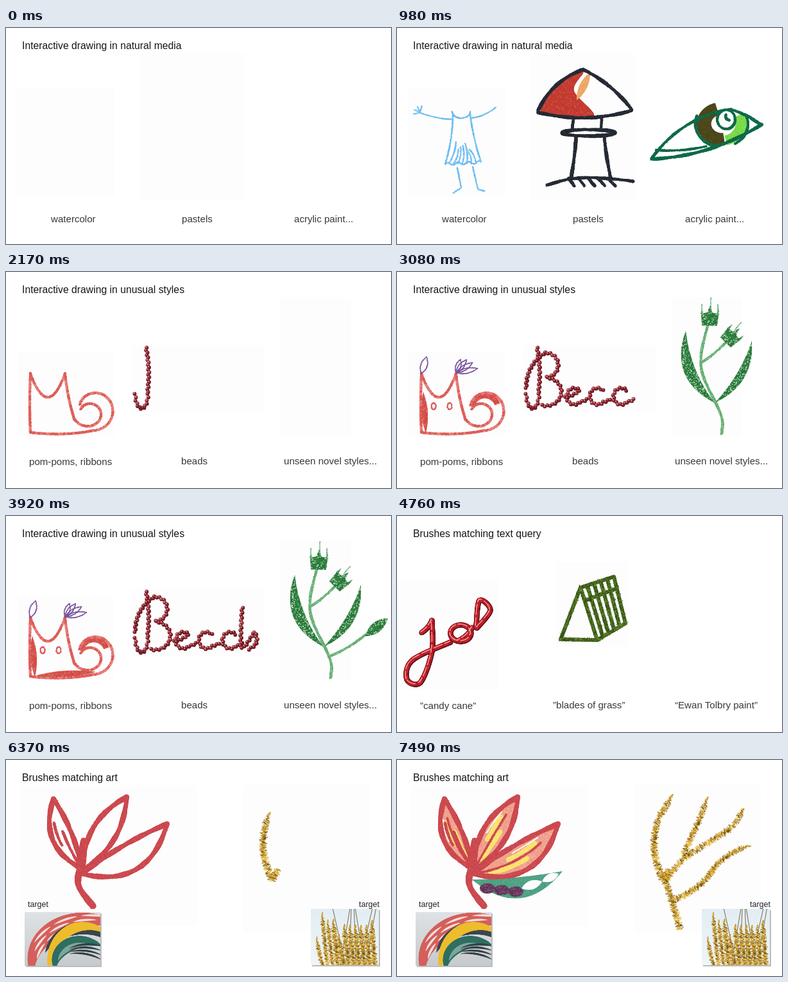
Write an HTML page with a canvas that moves like this. It is 600x338 px and loops after 7560 ms.

```html
<!DOCTYPE html>
<html lang="en">
<head>
<meta charset="utf-8">
<title>Brush styles</title>
<style>
html, body { margin: 0; width: 100%; height: 100%; overflow: hidden; background: #fff; }
canvas, svg { position: absolute; left: 0; top: 0; width: 600px; height: 338px; }
text { font-family: "Liberation Sans", Arial, sans-serif; }
.title { font-size: 15.75px; fill: #161616; }
.caption { font-size: 15.1px; fill: #383838; }
.small { font-size: 12.5px; fill: #222; }
</style>
</head>
<body>
<canvas id="art" width="600" height="338"></canvas>
<svg id="labels" viewBox="0 0 600 338"></svg>
<script>
const LOOP = 7560, STEP = 70;
const ctx = document.getElementById('art').getContext('2d');
const labels = document.getElementById('labels');

// Repeatable noise in 0..1
const noise = (i, k) => {
  const s = Math.sin(i * 12.9898 + k * 78.233) * 43758.5453;
  return s - Math.floor(s);
};
const jitter = (i, k, size) => (noise(i, k) - 0.5) * 2 * size;
const pick = (list, i, k) => list[Math.floor(noise(i, k) * list.length)];
const lerp = (a, b, t) => a + (b - a) * t;
const between = (a, b, t) => [lerp(a[0], b[0], t), lerp(a[1], b[1], t)];
const rad = deg => deg * Math.PI / 180;
const range = (n, fn) => Array.from({ length: n }, (_, i) => fn(i));

// Paths: lists of points about one pixel apart
const sample = (length, at) => {
  const n = Math.max(2, Math.round(length));
  return range(n + 1, i => at(i / n));
};

// Line that swells sideways by `bend` at its middle
const bow = (x1, y1, x2, y2, bend = 0) => {
  const len = Math.hypot(x2 - x1, y2 - y1);
  return sample(len + Math.abs(bend), t => {
    const off = 4 * t * (1 - t) * bend / len;
    return [lerp(x1, x2, t) - (y2 - y1) * off, lerp(y1, y2, t) + (x2 - x1) * off];
  });
};

// Elliptic arc, or a spiral when `shrink` differs from 1
const arc = (cx, cy, rx, ry, from, to, shrink = 1) =>
  sample(rad(Math.abs(to - from)) * (rx + ry) / 2, t => {
    const a = rad(lerp(from, to, t)), s = lerp(1, shrink, t);
    return [cx + rx * s * Math.cos(a), cy + ry * s * Math.sin(a)];
  });

// Closed shape between two bows sharing their ends
const blade = (x1, y1, x2, y2, bendA, bendB) =>
  [...bow(x1, y1, x2, y2, bendA), ...bow(x1, y1, x2, y2, bendB).reverse()];
const lens = (x1, y1, x2, y2, fat) => blade(x1, y1, x2, y2, fat, -fat);
const ray = (x, y, deg, len) => [x, y, x + len * Math.cos(rad(deg)), y + len * Math.sin(rad(deg))];

// Part of the ring between two ellipses
const ring = (cx, cy, rx, ry, from, to, inner) =>
  [...arc(cx, cy, rx, ry, from, to), ...arc(cx, cy, rx * inner, ry * inner, to, from)];

const wave = (x1, y1, x2, y2, size, cycles) => bow(x1, y1, x2, y2)
  .map(([x, y], i, all) => [x, y - size * Math.sin(i / all.length * cycles * 2 * Math.PI)]);

// Smooth curve through a few points
const spline = (path, closed) => {
  const knots = path.split(' ').map(p => p.split(',').map(Number)), n = knots.length;
  const at = i => closed ? knots[(i + n) % n] : knots[Math.max(0, Math.min(n - 1, i))];
  return range(closed ? n : n - 1, i => {
    const [a, b, c, d] = [at(i - 1), at(i), at(i + 1), at(i + 2)];
    const mix = (k, u) => 0.5 * (2 * b[k] + (c[k] - a[k]) * u
      + (2 * a[k] - 5 * b[k] + 4 * c[k] - d[k]) * u * u
      + (3 * b[k] - a[k] - 3 * c[k] + d[k]) * u * u * u);
    return sample(Math.hypot(c[0] - b[0], c[1] - b[1]), u => [mix(0, u), mix(1, u)]);
  }).flat();
};

// Toothed flower head growing from x,y
const bud = (x, y, deg, size) => {
  const a = rad(deg);
  return range(17, i => {
    const side = (i - 8) / 8;
    const out = size * (Math.abs(side) === 1 ? 0 : i % 4 ? 0.72 : 1.1) * (1 - 0.2 * Math.abs(side));
    const wide = size * 0.5 * Math.sin(side * Math.PI * 0.7);
    return [x + out * Math.cos(a) - wide * Math.sin(a), y + out * Math.sin(a) + wide * Math.cos(a)];
  });
};

function dot(x, y, r, color) {
  ctx.fillStyle = color;
  ctx.beginPath();
  ctx.arc(x, y, r, 0, 7);
  ctx.fill();
}

function dash(x, y, angle, len, width, color) {
  const dx = Math.cos(angle) * len / 2, dy = Math.sin(angle) * len / 2;
  ctx.strokeStyle = color;
  ctx.lineWidth = width;
  ctx.beginPath();
  ctx.moveTo(x - dx, y - dy);
  ctx.lineTo(x + dx, y + dy);
  ctx.stroke();
}

// First tone is the body, the rest are grain
const tones = {
  sky: ['#72bdf0', '#5fb0ea', '#9fdaf8'],
  coal: ['#262b35', '#1b1f27', '#3a404b'],
  pine: ['#0f6b49', '#0b5c3d', '#1b7b58'],
  brick: ['#c33b31', '#cb453a', '#b6322a', '#d76a5c'],
  peach: ['#eca663', '#f3bb85'],
  olive: ['#4c481c', '#5a5422', '#403c17'],
  lime: ['#7ada4b', '#8ae35f', '#6ccc42'],
  blush: ['#d6534c', '#e2847a', '#c23d3c'],
  coral: ['#e0615c', '#c94447'],
  plum: ['#6a4390', '#8460a8'],
  fern: ['#6db37a', '#a9d6ae', '#4f9a5d'],
  lace: ['#2c7d3d', '#226d33', '#e9f4e8', '#3a8b4a'],
  berry: ['#cc4a50', '#d65d61', '#bf3f46'],
  pink: ['#f0a18e', '#f6bba9', '#ea8d7e'],
  lemon: ['#fae46d', '#f5d857', '#fdf0a4'],
  sea: ['#4fa283', '#63b495', '#43917a'],
  wine: ['#6a3d60', '#4b2645', '#83577a'],
  rose: ['#e2307e', '#ec5b99'],
  sun: ['#f6cf2c', '#f9dd60'],
  aqua: ['#2fb2c4', '#57c5d3'],
  white: ['#fdfdfd']
};

const stroke = (paths, draw) => {
  const pts = paths.flatMap(path => path.map(([x, y], i) => {
    const o = path[Math.max(0, i - 1)], q = path[Math.min(path.length - 1, i + 1)];
    return [x, y, Math.atan2(q[1] - o[1], q[0] - o[0])];
  }));
  return { size: pts.length, draw: p => draw(pts.slice(0, Math.ceil(pts.length * p))) };
};

const rough = (tone, width, ...paths) => stroke(paths, pts => {
  const r = width / 2;
  pts.forEach(([x, y], i) => dot(x + jitter(i, 1, 0.35), y + jitter(i, 2, 0.35),
    r * (0.93 + 0.12 * Math.sin(i / 7)), tones[tone][0]));
  pts.forEach(([x, y], i) => dot(x + jitter(i, 5, r * 0.8), y + jitter(i, 6, r * 0.8),
    0.7, pick(tones[tone], i, 4)));
});

const ribbon = (...paths) => stroke(paths, pts => pts.forEach(([x, y, a], i) => {
  dot(x + jitter(i, 1, 0.4), y + jitter(i, 2, 0.4), 2, pick(['#e0615c', '#e8817b'], i >> 2, 3));
  if (i % 6 === 0) dash(x, y, a + 0.9, 4.6, 1.5, '#c94447');
}));

const beads = (...paths) => stroke(paths, pts => pts.forEach(([x, y, a], i) => {
  if (i % 4) return;
  const side = i % 8 ? 0.9 : -0.9;
  const bx = x - Math.sin(a) * side, by = y + Math.cos(a) * side;
  dot(bx + 0.4, by + 0.6, 2.9, '#5a141c');
  dot(bx, by, 2.4, pick(['#9a2631', '#87202a', '#b04350'], i, 1));
  dot(bx - 0.6, by - 0.6, 1, '#dfa5a9');
}));

const candy = (...paths) => stroke(paths, pts => {
  pts.forEach(([x, y]) => dot(x + 0.4, y + 0.5, 4.1, '#4e1015'));
  pts.forEach(([x, y], i) => dot(x, y, 3.2, i % 14 < 9 ? '#c5202b' : '#ae1722'));
  pts.forEach(([x, y], i) => i % 17 < 14 && dot(x - 0.9, y - 0.9, 0.8, '#eea9aa'));
});

const grass = (...paths) => stroke(paths, pts => {
  pts.forEach(([x, y]) => dot(x, y, 2.8, '#3f5e1c'));
  pts.forEach(([x, y, a], i) => dash(x + jitter(i, 1, 2.3), y + jitter(i, 2, 2.3),
    a + jitter(i, 3, 1.2), 5, 1, pick(['#2b4512', '#5d8128', '#47691f', '#71923a'], i, 4)));
});

// Fine cross hatching, thin at the start of the branch
const blossom = (width, ...paths) => stroke(paths, pts => pts.forEach(([x, y, a], i) => {
  const w = width * Math.min(1, 0.3 + i / 24);
  for (let k = 0; k < 3; k++) {
    const off = jitter(i, k + 1, w * 0.35);
    dash(x - Math.sin(a) * off, y + Math.cos(a) * off, a + 1.57 + jitter(i, k + 5, 0.6),
      w * (0.25 + 0.4 * noise(i, k + 11)), 0.9,
      pick(['#dfa71f', '#efc034', '#c88f18', '#e6b22a', '#ecc85c', '#7b591a', '#3b2c13'], i, k + 7));
  }
}));

const area = (tone, pts, grain = 0.15) => {
  const xs = pts.map(p => p[0]), ys = pts.map(p => p[1]);
  const x0 = Math.min(...xs), y0 = Math.min(...ys);
  const w = Math.max(...xs) - x0, h = Math.max(...ys) - y0;
  return {
    size: Math.max(20, w * h / 14),
    draw(p) {
      ctx.save();
      ctx.beginPath();
      pts.forEach(([x, y]) => ctx.lineTo(x, y));
      ctx.clip();
      ctx.fillStyle = tones[tone][0];
      ctx.fillRect(x0, y0, w, h * p);
      for (let i = 0; i < w * h * grain; i++) {
        const v = noise(i, 2);
        if (v < p) dot(x0 + w * noise(i, 1), y0 + h * v, 0.8, pick(tones[tone], i, 3));
      }
      ctx.restore();
    }
  };
};

// Shared pieces
const iris = (from, to, inner) => ring(506, 150, 39, 34, from, to, inner);
const roof = (a, b, c, d) => [
  bow(...a, ...b), bow(...b, ...c), bow(...c, ...a), bow(...a, ...d[0]), bow(...d[0], ...d[1]), bow(...c, ...d[1]),
  ...range(4, i => bow(...between(a, d[0], (i + 1) / 5), ...between(c, d[1], (i + 1) / 5))),
  bow(...between(a, c, 0.25), ...between(...d, 0.25))
];
const petals = [[74, 61, 118, 170, 25, -6], [188, 58, 120, 172, 20, -17], [251, 100, 118, 178, 5, -37]];
// A vein inside a petal: `mix` goes across it, from..to along it
const vein = ([x1, y1, x2, y2, a, b], mix, from, to) => {
  const pts = bow(x1, y1, x2, y2, lerp(a, b, mix));
  return pts.slice(pts.length * from, pts.length * to);
};

// Each group is [start, end, ...parts]; parts are drawn one after another.
const scenes = [
  {
    at: 0,
    title: 'Interactive drawing in natural media',
    captions: [[70, 304, 'watercolor'], [274, 304, 'pastels'], [449, 304, 'acrylic paint...']],
    panels: [[16, 93, 154, 171], [208, 40, 164, 231]],
    groups: [
      [70, 830,
        rough('sky', 2.6, arc(100, 131, 14, 10, 180, 0), bow(87, 134, 75, 213, -3), bow(114, 134, 131, 210, 2),
          wave(75, 213, 131, 210, 2, 3.5)),
        rough('sky', 2.3, ...range(7, i => bow(92 + i * 3.5, 175 + noise(i, 1) * 20, 81 + i * 7, 212, -2))),
        rough('sky', 2.4, bow(94, 219, 100, 250), bow(100, 250, 88, 258), bow(118, 217, 126, 252), bow(126, 252, 136, 255)),
        rough('sky', 2.2, bow(116, 141, 154, 124, 3))],
      [770, 980, rough('sky', 2.2, bow(86, 143, 37, 133, -2), ...range(4, i => bow(...ray(36, 132, 165 + i * 40, 10))))],
      [700, 980,
        area('brick', spline('223,127 252,88 290,69 276,98 307,137 260,140', true)),
        area('peach', lens(301, 69, 280, 113, 6))],
      [1010, 1540, area('peach', lens(304, 78, 308, 136, 7))],
      [70, 800,
        rough('coal', 5.6, bow(220, 129, 290, 65, -10), bow(290, 65, 366, 128, -6), bow(366, 129, 220, 132, -10)),
        rough('coal', 4.5, bow(275, 142, 273, 157), bow(319, 142, 318, 157)),
        rough('coal', 6, arc(299, 164, 41, 5, 180, 540)),
        rough('coal', 5.5, bow(279, 171, 271, 236, -1), bow(323, 170, 333, 235, 1)),
        rough('coal', 5, bow(234, 246, 300, 234, -3), bow(300, 234, 368, 240, -1),
          ...range(5, i => bow(268 + i * 15, 235, 276 + i * 16, 247)))],
      [650, 980, area('olive', iris(82, 255, 0.42)), area('lime', iris(-30, 78, 0.55))],
      [1010, 1540, area('lime', iris(78, 130, 0.8))],
      [70, 700,
        rough('pine', 4.6, bow(397, 204, 520, 127, -15), bow(520, 127, 568, 151, -2)),
        rough('pine', 5.4, bow(397, 205, 568, 151, 12)),
        rough('pine', 4, bow(404, 191, 482, 185, 3), bow(551, 142, 567, 151)),
        rough('pine', 4.6, arc(506, 150, 41, 36, 200, 100), arc(506, 150, 41, 36, -20, 60)),
        area('white', arc(513, 143, 14, 15, 0, 360)),
        rough('pine', 4.4, arc(513, 143, 14, 15, 0, 360), arc(518, 138, 6, 6, 200, 90))]
    ]
  },
  {
    at: 1750,
    title: 'Interactive drawing in unusual styles',
    captions: [[36, 302, 'pom-poms, ribbons'], [273, 301, 'beads'], [433, 301, 'unseen novel styles...']],
    panels: [[18, 125, 150, 133], [196, 115, 207, 104], [428, 40, 110, 218]],
    groups: [
      [2380, 2800, area('blush', lens(41, 188, 45, 252, 5)), area('blush', ring(137, 214, 25, 25, 190, 340, 0.65))],
      [3150, 3780, area('blush', lens(46, 250, 140, 244, 5))],
      [1750, 2170,
        ribbon(bow(38, 159, 38, 251, 1), bow(38, 251, 137, 248, 4), arc(137, 215, 33, 33, 90, -160, 0.7)),
        ribbon(bow(38, 159, 92, 159, 37)),
        ribbon(bow(92, 159, 107, 232, 2), arc(129, 221, 24, 22, 150, -150, 0.6))],
      [2750, 3080,
        rough('coral', 2.2, ...[57, 82].map(x => arc(x, 210, 3.5, 5, -90, 270))),
        rough('plum', 1.4, lens(38, 159, 46, 133, 5), ...range(4, i => lens(...ray(92, 158, -72 + i * 20, 22 + i * 4), 4)))],
      [1890, 2170, beads(bow(218, 118, 220, 190, -3), arc(211, 190, 10, 23, 0, 190))],
      [2200, 3080,
        beads(bow(201, 181, 229, 127, -8), arc(232, 145, 19, 19, -100, 90), arc(232, 187, 24, 22, -90, 105)),
        beads(bow(262, 196, 284, 184, 2)),
        beads(...[276, 312, 349].flatMap(x => [arc(x, 194, 12, 13, -45, -315), bow(x + 9, 203, x + 22, 197, 1)]))],
      [3110, 3780,
        beads(bow(368, 143, 366, 207, 1)),
        beads(bow(372, 204, 387, 181), bow(387, 181, 378, 208, -8))],
      [2400, 2990,
        rough('fern', 4.6, spline('506,253 505,224 478,165 474,130 485,80')),
        area('lace', blade(450, 92, 494, 204, 26, 8), 0.5),
        area('lace', blade(553, 108, 496, 204, -19, -6), 0.5)],
      [2800, 3080,
        area('lace', bud(487, 84, -88, 29), 0.5),
        rough('fern', 4, bow(474, 142, 516, 106, 2)),
        area('lace', bud(512, 110, -45, 28), 0.5),
        rough('fern', 1.2, bow(489, 60, 489, 40), bow(475, 66, 475, 50), bow(500, 66, 500, 51), bow(527, 90, 536, 79))],
      [3150, 3780,
        rough('fern', 4, bow(503, 220, 562, 184, 3)),
        area('lace', lens(560, 188, 595, 160, 8), 0.5)]
    ]
  },
  {
    at: 4130,
    title: 'Brushes matching text query',
    captions: [[36, 302, '”candy cane”'], [243, 301, '”blades of grass”'], [433, 301, '“Ewan Tolbry paint”']],
    panels: [[0, 100, 158, 172], [248, 72, 112, 132]],
    groups: [
      [4130, 4760,
        candy(bow(38, 182, 54, 163, 2), spline('54,163 54,212 36,260 15,255 24,225 83,197')),
        candy(arc(99, 183, 16, 13, 125, 490), bow(94, 195, 117, 174, 3)),
        candy(spline('123,172 128,132 145,147 124,175'))],
      [4790, 5390, candy(spline('124,175 138,183 147,163'), spline('147,163 138,232 114,256 151,205'))],
      [4200, 4760, grass(...roof([286, 112], [255, 193], [312, 194], [[338, 95], [356, 168]]))],
      [5200, 5670,
        area('sun', arc(484, 133, 12, 12, 0, 360), 0.05),
        area('aqua', lens(484, 260, 522, 205, 9), 0.05),
        area('aqua', lens(482, 260, 446, 212, 9), 0.05)],
      [4830, 5400,
        rough('rose', 6, ...range(5, i => lens(...ray(484, 133, i * 72 - 90, 40), 10))),
        rough('rose', 6, bow(484, 146, 483, 264, 3))]
    ]
  },
  {
    at: 5810,
    title: 'Brushes matching art',
    captions: [[34, 230, 'target', 'small'], [550, 230, 'target', 'small']],
    panels: [[22, 40, 276, 220], [369, 38, 198, 232]],
    targets: true,
    groups: [
      [6440, 7000, ...petals.map(p => area('pink', blade(...p)))],
      [6760, 7300, ...petals.flatMap(p => [
        rough('lemon', 7, vein(p, 0.35, 0.3, 0.62), vein(p, 0.65, 0.45, 0.85)),
        rough('white', 2, vein(p, 0.2, 0.25, 0.55))])],
      [6860, 7320, area('sea', blade(258, 174, 117, 187, -3, -36))],
      [7200, 7490,
        ...range(3, i => area('wine', arc(141 + i * 22, 201 + i * 2.5, 12, 8, 0, 360), 0.4)),
        area('white', lens(194, 201, 226, 190, 7)),
        area('white', lens(226, 190, 252, 178, 6))],
      [5810, 6370,
        rough('berry', 10, spline('136,229 113,196 117,160 121,126')),
        rough('berry', 8, ...petals.map(p => blade(...p))),
        rough('berry', 4.5, vein(petals[0], 0.3, 0.3, 0.62), vein(petals[0], 0.62, 0.45, 0.9))],
      [6700, 7350, ...petals.map(p => rough('berry', 3.5, vein(p, 0.5, 0.25, 0.95)))],
      [6020, 6370, blossom(11, bow(411, 82, 415, 188, 12), bow(415, 188, 424, 171))],
      [6400, 7490,
        blossom(11, bow(429, 54, 409, 88, -1)),
        blossom(11, bow(412, 175, 441, 265, -2)),
        blossom(10, spline('540,76 518,108 449,153 418,190')),
        blossom(10, bow(484, 58, 445, 150, -2)),
        blossom(10, bow(499, 162, 428, 220, -9)),
        blossom(9, bow(551, 134, 486, 181, 8))]
    ]
  }
];

// Band that is thin at both ends
const swath = (color, width, pts) => pts.forEach(([x, y], i) =>
  dot(x, y, 0.5 + width / 2 * Math.sin(i / pts.length * Math.PI), color));

function framed(x, y, w, h, top, bottom, paint) {
  ctx.fillStyle = '#b9bcc0';
  ctx.fillRect(x + 2, y + 2, w, h);
  const shade = ctx.createLinearGradient(x, y, x, y + h);
  shade.addColorStop(0, top);
  shade.addColorStop(1, bottom);
  ctx.save();
  ctx.beginPath();
  ctx.rect(x, y, w, h);
  ctx.clip();
  ctx.fillStyle = shade;
  ctx.fillRect(x, y, w, h);
  paint();
  ctx.restore();
}

const sprigs = range(11, i => {
  const x = 484 + i * 8.6, top = i ? 236 + noise(i, 2) * 40 : 277;
  return blossom(i < 3 ? 7 : 9, bow(x, top, x + 10 - i * 0.4, 324, 1));
});

function drawTargets() {
  framed(29, 238, 118, 84, '#dfe2e4', '#c6cacd', () => {
    swath('#d4605d', 27, arc(132, 322, 92, 72, 165, 305));
    range(9, i => arc(132, 322, 85 + i % 3 * 7, 65 + i % 3 * 7, 190 + i * 9, 212 + i * 9))
      .forEach(pts => swath('#f6dfdc', 2.4, pts));
    swath('#3d464d', 17, arc(118, 320, 60, 56, 200, 325));
    swath('#edbd2d', 15, arc(124, 322, 56, 62, 165, 310));
    swath('#2f6f62', 20, arc(122, 322, 46, 38, 170, 305));
    swath('#7fa59a', 7, arc(120, 322, 40, 33, 195, 290));
    range(4, i => bow(100, 294 + i * 3, 148, 291 + i * 7, -4)).forEach(pts => swath('#344047', 2.2, pts));
  });
  framed(475, 233, 106, 88, '#e2edf3', '#eff5f8', () => {
    range(7, i => dash(520 + i * 8, 280, 1.57 + jitter(i, 1, 0.35), 100, 0.9, '#6d5a3a'));
    sprigs.forEach(s => s.draw(1));
  });
}

const svgNode = name => document.createElementNS('http://www.w3.org/2000/svg', name);

function addText(parent, x, y, words, kind) {
  const node = svgNode('text');
  node.setAttribute('x', x);
  node.setAttribute('y', y);
  node.setAttribute('class', kind);
  node.textContent = words;
  parent.append(node);
}

scenes.forEach(scene => {
  scene.layer = svgNode('g');
  addText(scene.layer, 25, 32.5, scene.title, 'title');
  scene.captions.forEach(([x, y, words, kind = 'caption']) => addText(scene.layer, x, y, words, kind));
  labels.append(scene.layer);
});

function drawGroup([start, end, ...parts], time) {
  if (time <= start) return;
  const total = parts.reduce((sum, part) => sum + part.size, 0);
  let left = Math.min(1, (time - start) / (end - start)) * total;
  for (const part of parts) {
    if (left <= 0) break;
    part.draw(Math.min(1, left / part.size));
    left -= part.size;
  }
}

function render(time) {
  const scene = scenes.filter(s => s.at <= time).pop();
  scenes.forEach(s => s.layer.setAttribute('visibility', s === scene ? 'visible' : 'hidden'));
  ctx.fillStyle = '#fff';
  ctx.fillRect(0, 0, 600, 338);
  ctx.fillStyle = '#fdfdfd';
  scene.panels.forEach(box => ctx.fillRect(...box));
  if (scene.targets) drawTargets();
  scene.groups.forEach(group => drawGroup(group, time));
}

const begin = performance.now();
let shown = -1;
function tick() {
  const step = Math.floor((performance.now() - begin) % LOOP / STEP);
  if (step !== shown) render((shown = step) * STEP);
  requestAnimationFrame(tick);
}
tick();
</script>
</body>
</html>
```
